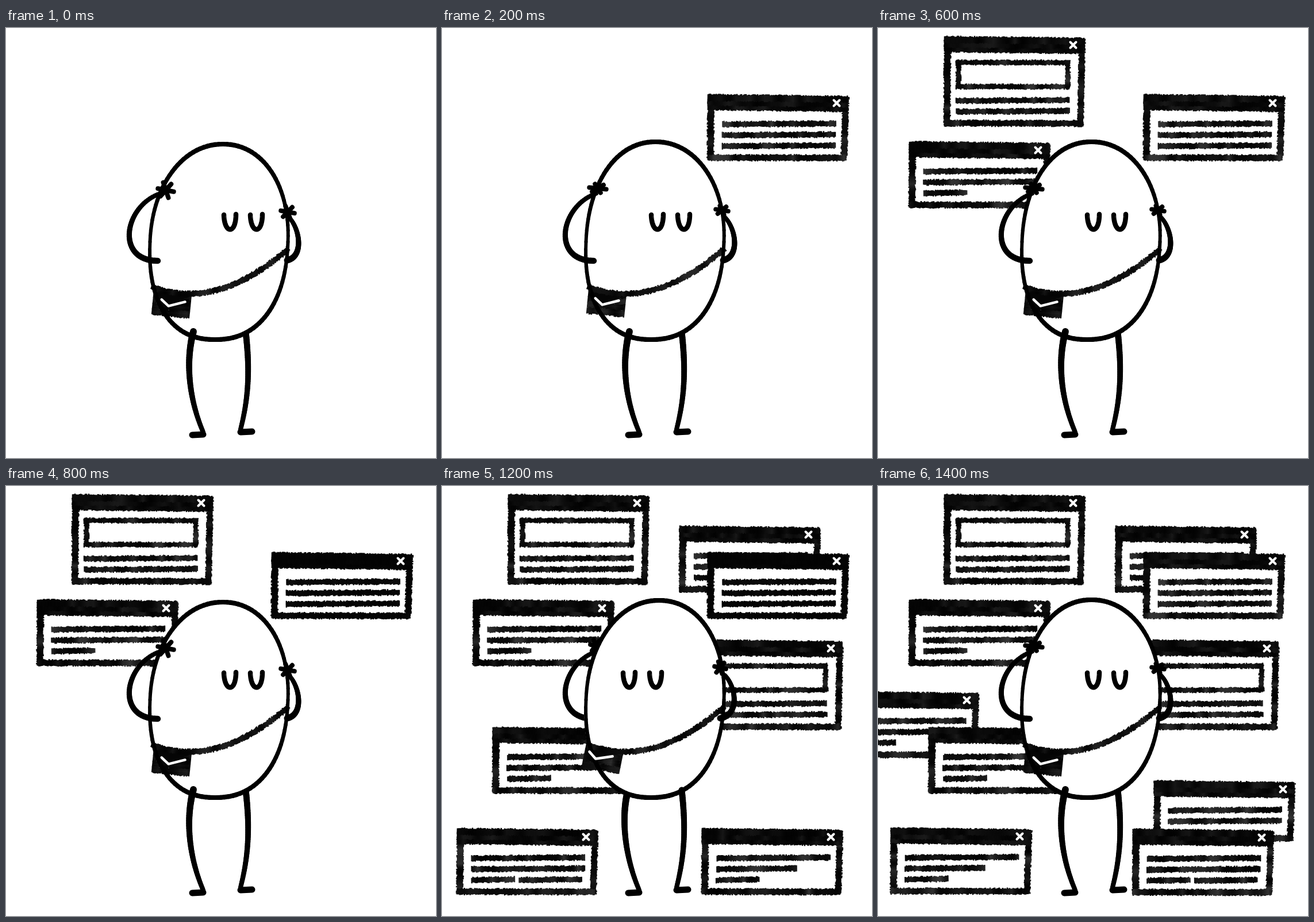
An HTML page with a canvas that plays this animation: 748 px wide and 748 px high, repeating every 1.6 s.

```html
<!DOCTYPE html>
<html lang="en">
<head>
<meta charset="utf-8">
<title>Popup overload</title>
<style>
  html, body { margin: 0; width: 100%; height: 100%; overflow: hidden; background: #fff; }
  canvas { display: block; width: 748px; height: 748px; }
</style>
</head>
<body>
<canvas id="stage" width="748" height="748"></canvas>
<script>
const ctx = document.getElementById('stage').getContext('2d');
const STEP = 200, STEPS = 8, LAST = STEPS - 1;

let seed = 1;
function rnd() {
  seed = (seed * 16807) % 2147483647;
  return seed / 2147483647;
}
function reseed(n) {
  seed = Math.floor(Math.abs(n) * 7919) % 2147483646 + 1;
  for (let i = 0; i < 4; i++) rnd();
}

// Cubic Bezier as a list of points
function bezier(a, b, c, d) {
  return Array.from({ length: 41 }, (_, i) => {
    const t = i / 40, u = 1 - t;
    return [0, 1].map(j => u * u * u * a[j] + 3 * u * u * t * b[j]
      + 3 * u * t * t * c[j] + t * t * t * d[j]);
  });
}

function fill(pts, color) {
  ctx.fillStyle = color;
  ctx.beginPath();
  pts.forEach(p => ctx.lineTo(p[0], p[1]));
  ctx.closePath();
  ctx.fill();
}

function line(pts, width, color = '#000') {
  ctx.strokeStyle = color;
  ctx.lineWidth = width;
  ctx.lineCap = ctx.lineJoin = 'round';
  ctx.beginPath();
  pts.forEach(p => ctx.lineTo(p[0], p[1]));
  ctx.stroke();
}

// Ink stroke whose width follows widthAt(progress, y)
function ink(pts, widthAt) {
  for (let i = 1; i < pts.length; i++)
    line([pts[i - 1], pts[i]], widthAt(i / pts.length, pts[i][1]));
}
const limb = (pts, w0, w1) => ink(pts, t => w0 + (w1 - w0) * t);

// Bristly stroke: short hairs across the path, with slow mottling up to tone
function brush(pts, width, tone) {
  const reach = () => width / 2 - 1.3 + rnd() * 2.4;
  let left = 0, patch = 0, from = rnd(), to = rnd();
  ctx.lineCap = 'butt';
  ctx.lineWidth = 2.6;
  for (let i = 1; i < pts.length; i++) {
    const [x0, y0] = pts[i - 1], [x1, y1] = pts[i];
    const len = Math.hypot(x1 - x0, y1 - y0);
    const ux = (x1 - x0) / len, uy = (y1 - y0) / len;
    let d = left;
    for (; d < len; d += 2) {
      patch += 0.16;
      if (patch >= 1) { patch -= 1; from = to; to = rnd(); }
      const mix = from + (to - from) * patch;
      const g = Math.round(3 + tone * mix * mix);
      const up = reach(), down = reach();
      const x = x0 + ux * d, y = y0 + uy * d;
      ctx.strokeStyle = `rgb(${g},${g},${g})`;
      ctx.beginPath();
      ctx.moveTo(x + uy * up, y - ux * up);
      ctx.lineTo(x - uy * down, y + ux * down);
      ctx.stroke();
    }
    left = d - len;
  }
}

// Text rows as start and end fractions of the full row
const whole = [0, 1], cut = [0, 0.38];
const KINDS = {
  full: { h: 114, rows: [whole, whole, whole] },
  short: { h: 114, rows: [whole, whole, cut] },
  step: { h: 114, rows: [whole, [0, 0.71], cut] },
  split: { h: 114, rows: [whole, whole, [...cut, 0.42, 0.97]] },
  low: { h: 104, rows: [whole, whole] },
  tall: { h: 155, rows: [whole, whole], box: true }
};

function popup(x, y, kind, tone) {
  const { h, rows, box } = KINDS[kind];
  reseed(x * 13 + y + 997);
  ctx.save();
  ctx.translate(x, y);
  fill([[4, 4], [240, 7], [236, h - 4], [3, h - 4]], '#fff');
  brush([[5, 1], [4, h]], 12, tone);
  brush([[239.5, 5], [236, h]], 11, tone);
  brush([[0, h - 4.5], [239, h - 4]], 11, tone);
  for (const r of [21, 13, 5]) brush([[0, r], [243, r + 3]], 12, tone * 0.5);
  if (box) {
    for (const r of [45, 87]) brush([[20, r], [218, r]], 9, tone);
    for (const c of [24, 214]) brush([[c, 42], [c, 90]], 9, tone);
  }
  rows.forEach((row, i) => {
    const r = (box ? 111 : 51) + 19 * i, start = (box ? 21 : 26) - 2 * rnd();
    for (let k = 0; k < row.length; k += 2)
      brush([[start + 197 * row[k], r + 0.6], [start + 197 * row[k + 1], r - 0.8]], 10, tone);
  });
  for (const s of [-5, 5]) line([[223.5 - s, 9.5], [223.5 + s, 19.5]], 4, '#fff');
  ctx.restore();
}

// Back to front: x, y, kind, first step, last step
const POPUPS = [
  [414, 70, 'full', 5],
  [463, 116, 'full', 1],
  [55, 198, 'short', 2],
  [116, 15, 'tall', 3],
  [-69, 358, 'short', 7],
  [89, 420, 'short', 5],
  [453, 268, 'tall', 6],
  [453, 585, 'step', 5, 5],
  [453, 596, 'step', 6, 6],
  [27, 596, 'split', 6, 6],
  [23, 595, 'step', 7],
  [481, 513, 'low', 7],
  [444, 597, 'split', 7]
];

// Head turn: look and lean shift the face and crown; hands are x, y and radii
const RIGHT = {
  look: 0, lean: 0, top: 202,
  hands: [[278, 282, 14, 14], [490, 320, 12, 11]],
  bag: [258, 459], tilt: 0.1, fold: 27
};
const MIDDLE = {
  look: -15, lean: -6, top: 198,
  hands: [[271, 279, 15, 8], [487, 317, 11, 8]],
  bag: [256, 457], tilt: 0.1, fold: 25
};
const LEFT = {
  look: -64, lean: 0, top: 199,
  hands: [[267, 278, 9, 11], [484, 316, 10, 11]],
  bag: [252, 449], tilt: 0.2, fold: 20,
  away: true
};
const BACK = { ...MIDDLE, bag: RIGHT.bag, fold: RIGHT.fold };
const POSES = [RIGHT, MIDDLE, LEFT, BACK];

// Slightly sheared superellipse, squarer at the bottom
function egg({ lean, top }, dx = 0) {
  const pow = (v, n) => Math.sign(v) * Math.abs(v) ** (2 / n);
  return Array.from({ length: 121 }, (_, i) => {
    const a = i / 60 * Math.PI, c = Math.cos(a), s = Math.sin(a);
    const n = s < 0 ? 2.1 : 2.3;
    const rise = pow(s, n);
    const y = 372 + rise * (s < 0 ? 372 - top : 170);
    const sway = s < 0 ? lean * rise * rise : 0;
    return [370.5 + dx + 120 * pow(c, n) - (y - 372) * 0.04 + sway, y];
  });
}

function hand([x, y, rx, ry]) {
  for (let k = 0; k < 6; k++) {
    const a = k * Math.PI / 3 + 0.2;
    line([[x, y], [x + rx * Math.cos(a), y + ry * Math.sin(a)]], 8);
  }
}
function leftSide({ hands, away }) {
  limb(bezier([away ? 322 : 326, away ? 536 : 528], [312, 580], [318, 645], [343, 703]), 12, 8);
  line([[324, 708], [343, 707]], 11);
  limb(bezier([268, 288], [205, 310], [190, 405], [264, 405]), 7.5, 10.5);
  hand(hands[0]);
}
function rightLeg() {
  limb(bezier([417, 529], [424, 590], [423, 640], [408, 698]), 11, 8);
  line([[408, 703], [428, 702]], 11);
}

// Runs paint in the bag's own tilted frame
function onBag({ bag, tilt }, paint) {
  ctx.save();
  ctx.translate(...bag);
  ctx.rotate(tilt);
  paint();
  ctx.restore();
}
function satchel(pose) {
  reseed(pose.fold);
  onBag(pose, () => {
    for (let r = 4; r < 40; r += 10) brush([[0, r], [66, r]], 12, 40);
    fill([[0, 0], [pose.fold, 22], [66, 0]], '#050505');
  });
  brush(bezier([491, 384], [410, 455], [330, 480], [252, 450]), 10, 40);
}

function person(pose) {
  const { away, look, fold } = pose;
  if (away) leftSide(pose);
  else rightLeg();
  fill(egg(pose, -3), '#fff');
  satchel(pose);
  ink(egg(pose), (t, y) => 5.8 + 2.4 * Math.abs(y - 370) / 170);
  onBag(pose, () => line([[fold - 13, 12], [fold, 22], [fold + 28, 12]], 4.5, '#fff'));
  if (away) rightLeg();
  else leftSide(pose);
  limb(bezier([492, 329], [512, 350], [518, 398], [away ? 484 : 489, 404]), 7, 11);
  hand(pose.hands[1]);
  for (const x of [389 + look, 435 + look])
    line(bezier([x - 10, 325], [x - 9, 359], [x + 11, 359], [x + 11, 324]), 8.5);
}

function draw(step) {
  ctx.fillStyle = '#fff';
  ctx.fillRect(0, 0, 748, 748);
  POPUPS.forEach(([x, y, kind, first, last = LAST], i) => {
    const bold = i === 1 && step > 3 && step < LAST;
    if (step >= first && step <= last) popup(x, y, kind, bold ? 6 : 50);
  });
  person(POSES[step % POSES.length]);
}

let shown = -1;
function tick() {
  const step = Math.floor(performance.now() / STEP) % STEPS;
  if (step !== shown) draw(shown = step);
  requestAnimationFrame(tick);
}
tick();
</script>
</body>
</html>
```
